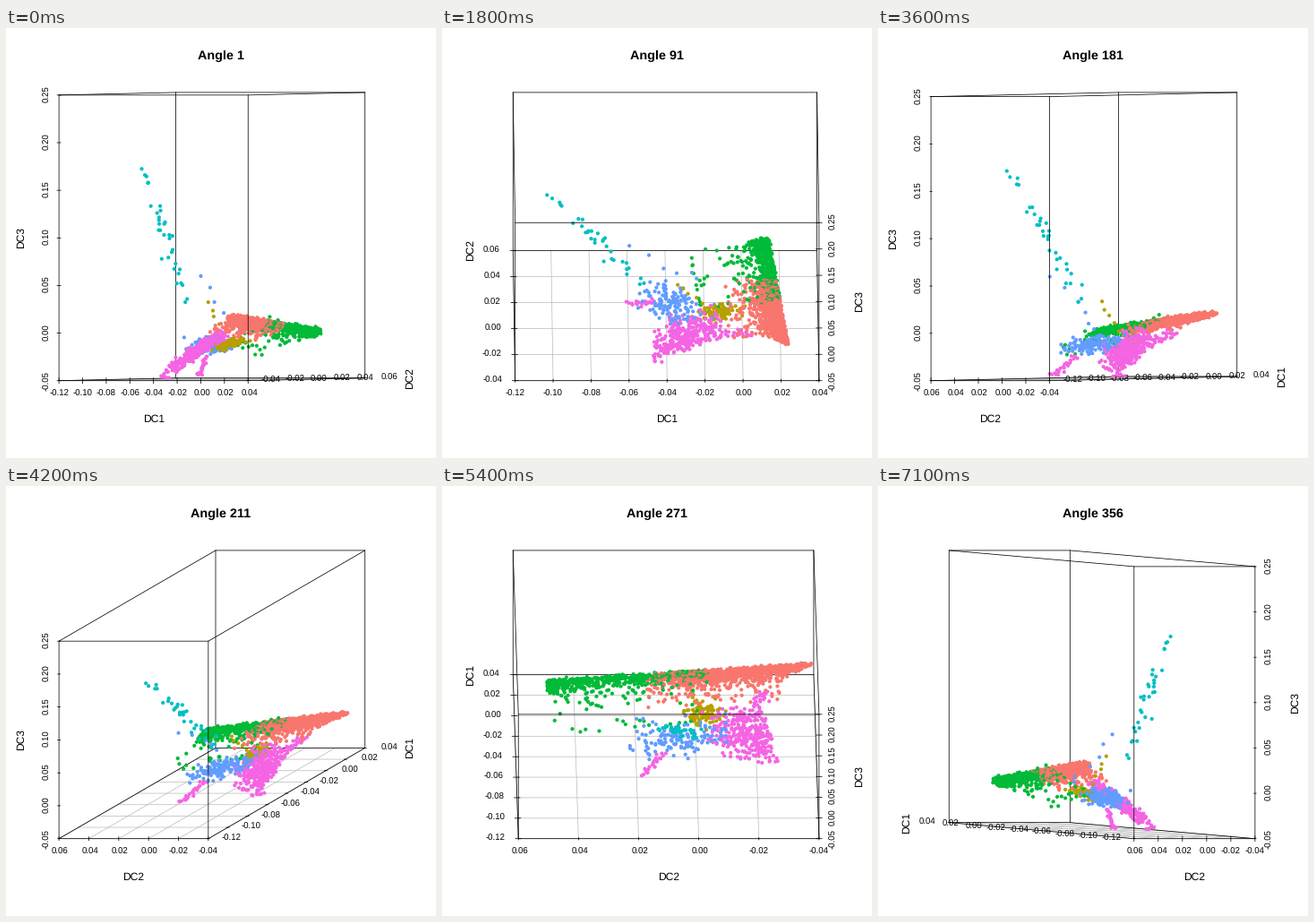
Recreate the animation shown at these times as a matplotlib script. Size 480 px wide and 480 px high, loop 7200 ms.

```python
import numpy as np
import matplotlib.pyplot as plt
from matplotlib.animation import FuncAnimation

plt.rcParams["font.family"] = "Liberation Sans"
plt.rcParams["text.hinting"] = "none"

SIZE, LINE = 480, 14.4                      # stage and text line height, px
LEFT, RIGHT, TOP, BOTTOM = 59.11, 420.89, 71.91, 393.69
EDGE_L, EDGE_R, EDGE_B = 44.64, 435.36, 406.56
W, H = RIGHT - LEFT, BOTTOM - TOP
LABEL_W = 21.35
SMALL, NORMAL, LARGE = 9.6, 12, 14.4
NZ = 6
FRAMES, INTERVAL = 72, 100

SALMON, GOLD, GREEN = "#F8766D", "#B79F00", "#00BA38"
CYAN, BLUE, PINK = "#00BFC4", "#619CFF", "#F564E3"

rng = np.random.default_rng(7)


# Points are (DC1, DC2, DC3), counted in grid steps from the box corner.

def strand(start, end, n, noise=0.04):
    """Points spread evenly along a line, with some scatter."""
    t = np.linspace(0, 1, n)[:, None]
    return np.array(start) * (1 - t) + np.array(end) * t + rng.normal(0, noise, (n, 3))


def ridge(b, drop, noise=0.03):
    """Points on the sloping sheet; drop is the distance below its crest."""
    a = 7.2 - 0.1 * b - drop
    h = 1.36 - 0.08 * b - 0.2 * drop + rng.normal(0, noise, len(b))
    return np.column_stack([a, b, h])


def salmon():
    b = 0.03 + 2.8 * rng.beta(1.6, 1.8, 850)
    body = ridge(b, rng.gamma(1.8, 0.17, 850) * np.minimum(1, 0.1 + b))
    b = rng.uniform(0.5, 2.8, 50)
    return np.vstack([body, ridge(b, rng.uniform(0.4, 1.4, 50), 0.05)])


def green():
    b = 4.45 - 2.7 * rng.random(480) ** 1.4
    drop = rng.gamma(2.2, 0.1, 480)
    loose = 4.35 - 2.4 * rng.random(100) ** 1.4
    fall = np.minimum(rng.gamma(1.6, 0.5, 100), 2.1)
    return np.vstack([ridge(b, drop), ridge(loose, fall, 0.05)])


def gold():
    a = rng.normal(5.45, 0.27, 90)
    b = rng.normal(1.86, 0.15, 90)
    h = 0.77 + 0.15 * (a - 5.45) + rng.normal(0, 0.04, 90)
    return np.vstack([np.column_stack([a, b, h]),
                      strand((4.3, 2.08, 1.6), (4.9, 2.0, 1.0), 5)])


def blue():
    b = np.clip(rng.normal(2.25, 0.4, 135), 1.5, 3.1)
    a = 4.17 - 0.3 * (b - 2.3) + rng.normal(0, 0.36, 135)
    h = 0.72 + 0.12 * (a - 4.2) + rng.normal(0, 0.09, 135)
    return np.vstack([np.column_stack([a, b, h]),
                      strand((3.1, 2.8, 2.1), (4.9, 2.8, 1.0), 6, 0.12)])


def pink():
    a = 3.56 + 1.95 * rng.beta(2, 2.1, 310)
    b = 0.72 + 1.15 * rng.beta(1.5, 2.4, 310) + 0.12 * (a - 4.5)
    h = 0.55 + 0.37 * (a - 4.5) + 0.25 * (b - 1.15) + rng.normal(0, 0.06, 310)
    return np.vstack([np.column_stack([a, b, np.maximum(h, 0.05)]),
                      strand((3.05, 2.88, 0.08), (3.7, 2.55, 0.48), 22),
                      strand((5.1, 1.05, 0.75), (6.2, 0.85, 0.95), 36, 0.06)])


def cyan():
    return np.vstack([strand((0.9, 2.65, 4.36), (1.3, 2.55, 4.12), 5),
                      strand((1.65, 2.45, 3.6), (2.4, 2.35, 2.95), 15, 0.08),
                      strand((2.4, 2.25, 2.7), (3.35, 2.0, 1.8), 13, 0.12)])


groups = [(salmon(), SALMON), (gold(), GOLD), (green(), GREEN),
          (cyan(), CYAN), (blue(), BLUE), (pink(), PINK)]
points = np.vstack([g for g, _ in groups])
colors = np.concatenate([[c] * len(g) for g, c in groups])

DC1 = ("DC1", 8, [(k - 6) * 0.02 for k in range(9)])
DC2 = ("DC2", 5, [(k - 2) * 0.02 for k in range(6)])
DC3 = [(k - 1) * 0.05 for k in range(NZ + 1)]

fig = plt.figure(figsize=(SIZE / 72, SIZE / 72), dpi=72, facecolor="white")
ax = fig.add_axes([0, 0, 1, 1])


def write(x, y, s, size=SMALL, ha="center", turn=0, **kw):
    ax.text(x, y, s, fontsize=size, ha=ha, va="baseline", rotation=turn,
            rotation_mode="anchor", zorder=1, **kw)


def space(v):
    """Width of the blank that stands in for a minus sign."""
    return 0 if v < 0 else 2.67


def draw(i):
    ax.clear()
    ax.set(xlim=(0, SIZE), ylim=(SIZE, 0))
    ax.axis("off")

    angle = 1 + 5 * i
    q = angle / 90
    rise = abs(q if q < 1 else q - 4 if q > 3 else 2 - q)
    shift = 1 - q if q < 2 else q - 3
    swap, lean_left = q > 2, 1 < q <= 3
    z_right = 1 < q <= 2 or q > 3
    (x_name, nx, x_vals), (y_name, ny, y_vals) = (DC2, DC1) if swap else (DC1, DC2)

    span = nx + abs(shift) * ny
    pad = LABEL_W * span / W
    ux, uz = W / (span + pad), H / (NZ + rise * ny)
    low = shift * ny - pad if lean_left else 0

    def project(x, y, z):
        dx = (x + shift * y - low) * ux
        return (RIGHT - dx if swap else LEFT + dx), BOTTOM - (z + rise * y) * uz

    def seg(p, r, color="black", z=1):
        (x0, y0), (x1, y1) = project(*p), project(*r)
        ax.plot([x0, x1], [y0, y1], color=color, lw=0.75, zorder=z,
                solid_capstyle="round", snap=False)

    for k in range(nx + 1):
        seg((k, 0, 0), (k, ny, 0), "#BEBEBE")
    for k in range(ny + 1):
        seg((0, k, 0), (nx, k, 0), "#BEBEBE")

    y_at, z_at = (0, nx) if lean_left else (nx, 0)
    tx, tz = nx * 0.01, NZ * 0.01

    for k, v in enumerate(x_vals):
        seg((k, 0, -tz), (k, 0, tz))
        write(project(k, 0, 0)[0] + space(v) / 2, EDGE_B + 0.3 * LINE, f"{v:.2f}")
    for k, v in enumerate(y_vals):
        seg((y_at - tx, k, 0), (y_at + tx, k, 0))
        x, y = project(y_at, k, 0)
        if z_right:
            write(x - LINE, y + 2.3, f"{v:.2f}", ha="right")
        else:
            write(x + LINE + space(v) + 0.4, y + 2.3, f"{v:.2f}", ha="left")
    z_x = EDGE_R + 0.3 * LINE if z_right else EDGE_L + 0.3 * LINE
    for k, v in enumerate(DC3):
        seg((z_at - tx, 0, k), (z_at + tx, 0, k))
        write(z_x, project(0, 0, k)[1] - space(v) / 2, f"{v:.2f}", turn=90)

    write(project(nx / 2, 0, 0)[0], EDGE_B + 2.3 * LINE, x_name, NORMAL)
    if z_right:
        y_x, z_x = EDGE_L - 0.7 * LINE, EDGE_R + 2.3 * LINE
    else:
        y_x, z_x = EDGE_R + 1.3 * LINE, EDGE_L - 1.7 * LINE
    write(y_x, project(0, ny, 0)[1], y_name, NORMAL, turn=90)
    write(z_x, project(0, 0, NZ / 2)[1], "DC3", NORMAL, turn=90)
    write(SIZE / 2, 34.6, f"Angle {angle}", LARGE, weight="bold")

    # axes and the far side of the box
    seg((0, 0, 0), (nx, 0, 0))
    seg((z_at, 0, 0), (z_at, 0, NZ))
    for x in (0, nx):
        seg((x, 0, 0), (x, ny, 0))
        seg((x, ny, 0), (x, ny, NZ))
    for z in (0, NZ):
        seg((0, ny, z), (nx, ny, z))
    seg((0, 0, NZ), (0, ny, NZ))

    x, y, z = points.T
    if swap:
        x, y = y, x
    order = np.argsort(-y, kind="stable")
    px, py = project(x[order], y[order], z[order])
    ax.scatter(px, py, s=4.2 ** 2, c=colors[order], linewidths=0, zorder=2)

    # near side of the box
    seg((0, 0, NZ), (nx, 0, NZ), z=3)
    seg((nx, 0, NZ), (nx, ny, NZ), z=3)
    seg((y_at, 0, 0), (y_at, 0, NZ), z=3)
    return []


anim = FuncAnimation(fig, draw, frames=FRAMES, interval=INTERVAL,
                     init_func=lambda: [], repeat=True, repeat_delay=0)
plt.show()
```
